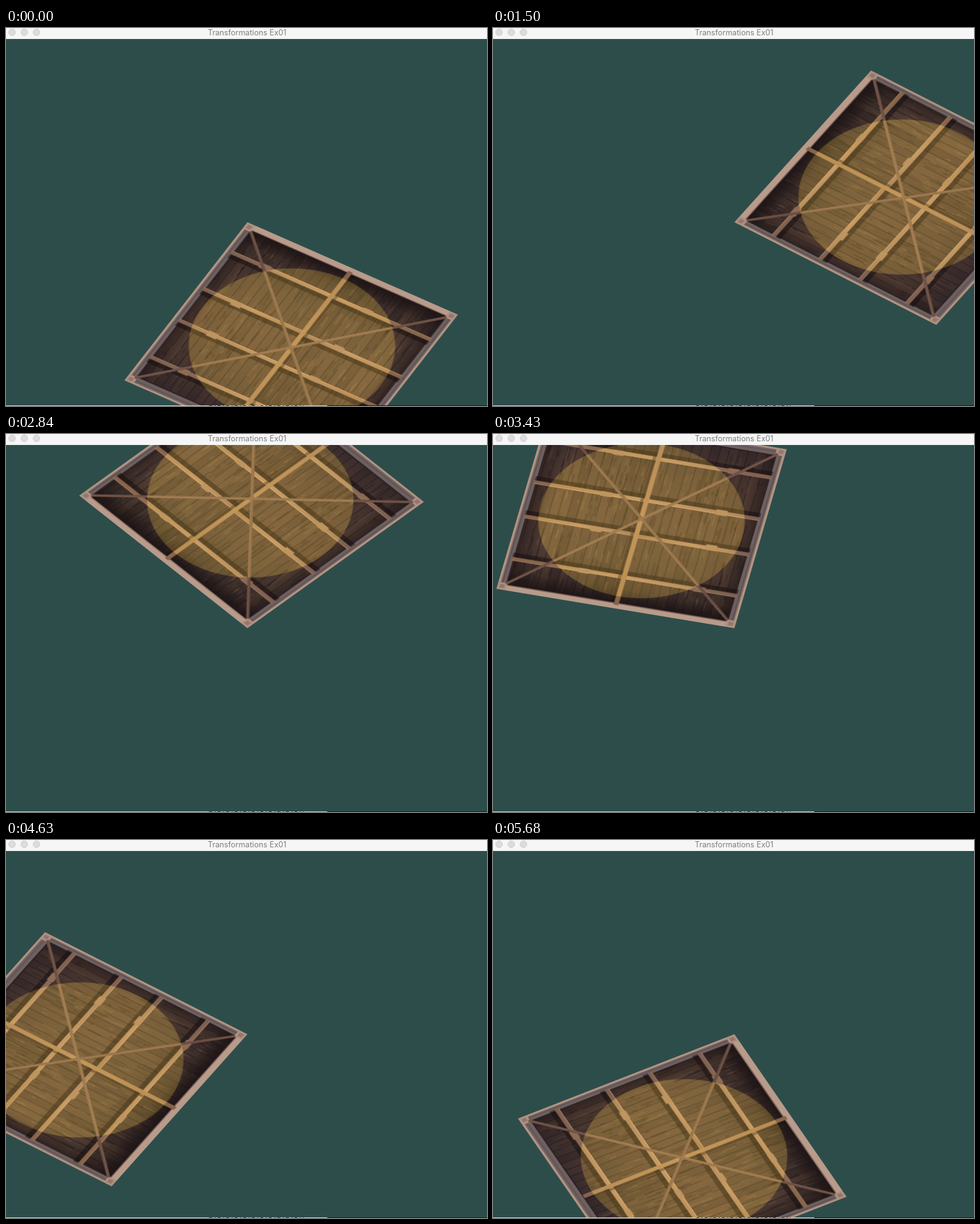
These frames come from a looping animation (789x619 px, 5780 ms). An HTML page with a canvas:

```html
<!DOCTYPE html>
<html lang="en">
<head>
<meta charset="utf-8">
<title>Transformations Ex01</title>
<style>
  html, body { margin: 0; width: 100%; height: 100%; overflow: hidden; }
  .stage { position: relative; width: 789px; height: 619px; overflow: hidden; background: #2d4d4b; }
  .bar {
    position: absolute; inset: 0 0 auto; height: 18px; background: #f6f6f6;
    box-shadow: inset 0 -1px #f0f7f4;
    font: 12.7px/15px Inter, sans-serif; color: #7d7d7d; text-align: center; text-indent: 2px;
  }
  .dot {
    position: absolute; top: 1px; width: 12px; height: 12px; box-sizing: border-box;
    border: 1px solid #cfcfcf; border-radius: 50%; background: #dcdcdc;
  }
  .view { position: absolute; inset: 18px 0 1px; overflow: hidden; }
  /* Rotation happens in square space, then the 4:3 viewport widens it. */
  .wide { position: absolute; left: 396px; top: 300px; transform: scale(1.33333, 1); transform-origin: 0 0; }
  .crate {
    display: block; width: 300px; height: 300px; transform-origin: 0 0;
    animation: spin 5780ms -2ms infinite;
  }
  .edge {
    position: absolute; inset: auto 0 0; height: 1px;
    background: linear-gradient(90deg, #d4d6d6 527px, #191420 527px);
  }
  .edge::after {
    content: ""; position: absolute; left: 333px; top: 0; width: 155px; height: 1px;
    background: repeating-linear-gradient(90deg, #555 0 5px, #d4d6d6 5px 9px, #777 9px 11px, #d4d6d6 11px 14px);
  }
  @keyframes spin {
    0%       { transform: rotate(30.3deg);    animation-timing-function: steps(4); }
    10.3806% { transform: rotate(-4.2deg);    animation-timing-function: steps(6); }
    25.9516% { transform: rotate(-55.9deg);   animation-timing-function: steps(5); }
    38.9273% { transform: rotate(-99.65deg);  animation-timing-function: steps(1); }
    41.3495% { transform: rotate(-108.14deg); animation-timing-function: steps(6); }
    56.9204% { transform: rotate(-159.11deg); animation-timing-function: steps(1); }
    59.3426% { transform: rotate(-167.6deg);  animation-timing-function: steps(8); }
    80.1038% { transform: rotate(-236.15deg); animation-timing-function: steps(7); }
    98.2699%, 100% { transform: rotate(-297.4deg); }
  }
</style>
</head>
<body>
<div class="stage">
  <div class="view"><div class="wide"><canvas class="crate" width="900" height="900"></canvas></div></div>
  <div class="bar">
    <i class="dot" style="left:4px"></i><i class="dot" style="left:24px"></i><i class="dot" style="left:44px"></i>
    Transformations Ex01
  </div>
  <div class="edge"></div>
</div>
<script>
  const ctx = document.querySelector('.crate').getContext('2d');
  ctx.scale(3, 3);

  let seed = 7;
  const rand = () => (seed = (seed * 16807) % 2147483647) / 2147483647;

  function rect(x, y, w, h, fill) {
    ctx.fillStyle = fill;
    ctx.fillRect(x, y, w, h);
  }

  function line(x1, y1, x2, y2, width, color) {
    ctx.lineWidth = width;
    ctx.strokeStyle = color;
    ctx.beginPath();
    ctx.moveTo(x1, y1);
    ctx.lineTo(x2, y2);
    ctx.stroke();
  }

  function fade(x1, y1, x2, y2, ...stops) {
    const g = ctx.createLinearGradient(x1, y1, x2, y2);
    stops.forEach((c, i) => g.addColorStop(i / (stops.length - 1), c));
    return g;
  }

  function planks() {
    rect(0, 0, 300, 300, fade(0, 0, 0, 300, '#2b2121', '#4a3932', '#513d35', '#493731', '#33282a'));
    for (let x = 10; x < 290; x += 11.5) {
      const tone = rand();
      rect(x, 10, 11.5, 280, tone < .5 ? `rgba(20,12,12,${.22 * tone})` : `rgba(140,100,70,${.22 * (tone - .5)})`);
      rect(x, 10, 1, 280, 'rgba(24,16,16,.5)');
    }
    // soft grain
    for (let i = 0; i < 420; i++) {
      const light = rand() < .5;
      rect(10 + rand() * 280, 10 + rand() * 260, 1 + rand() * 2.2, 5 + rand() * 17,
        light ? 'rgba(150,112,80,.17)' : 'rgba(22,14,14,.22)');
    }
    rect(10, 8, 280, 24, fade(0, 8, 0, 32, 'rgba(24,16,18,.75)', 'rgba(24,16,18,0)'));
    rect(10, 10, 24, 280, fade(10, 0, 34, 0, 'rgba(24,16,18,.5)', 'rgba(24,16,18,0)'));
    rect(266, 10, 24, 280, fade(266, 0, 290, 0, 'rgba(24,16,18,0)', 'rgba(24,16,18,.5)'));
  }

  function frame() {
    const band = '#6e6060', rim = '#b39582';
    rect(0, 0, 10, 300, band);
    rect(290, 0, 10, 300, band);
    rect(0, 288, 300, 12, band);
    rect(10, 10, 1.5, 278, '#2c2223');
    rect(288.5, 10, 1.5, 278, '#2c2223');
    rect(10, 286, 280, 2, '#2c2223');
    rect(5, 10, 1, 280, '#574a4c');
    rect(294, 10, 1, 280, '#574a4c');
    rect(10, 293, 280, 1, '#574a4c');
    rect(0, 0, 3, 300, rim);
    rect(297, 0, 3, 300, rim);
    rect(0, 297, 300, 3, rim);
    rect(0, 0, 300, 9, '#b89b8a');
    rect(0, 8, 300, 1.5, '#85695d');
    rect(10, 12, 280, 1.5, '#211819');
    for (const x of [0, 288]) for (const y of [0, 288]) {
      rect(x, y, 12, 12, '#ae9182');
      rect(x + 3, y + 3, 6, 6, '#92776a');
    }
  }

  function beam(x, y, w) {
    rect(x, y + 3, w, 7, 'rgba(20,13,14,.5)');
    rect(x, y - 3, w, 6, fade(x, 0, x + w, 0, '#7d6051', '#97735a', '#856449'));
    rect(x, y - 3, w, 1.2, 'rgba(190,150,118,.4)');
  }

  function beams() {
    beam(8, 52.5, 284);
    beam(8, 121.5, 142);
    beam(150, 123.5, 142);
    beam(8, 181, 284);
    beam(8, 250.5, 284);
    for (const y of [52.5, 122.5, 181, 250.5]) {
      rect(49, y - 4.5, 14, 9, '#8d6b55');
      rect(194, y - 4.5, 14, 8, '#8d6b55');
    }
    rect(154, 10, 4, 276, 'rgba(20,13,14,.4)');
    rect(147.5, 6, 6, 281, fade(0, 0, 0, 300, '#876349', '#946f50', '#85634f'));
    line(11, 11, 289, 290, 4, '#654b41');
    line(290, 11, 9, 290, 4, '#6b5045');
    line(11, 10, 289, 289, 1, '#79594a');
    line(290, 10, 9, 289, 1, '#7b5b4b');
  }

  function disc() {
    ctx.globalCompositeOperation = 'lighter';
    ctx.fillStyle = 'rgb(49,41,10)';
    ctx.beginPath();
    ctx.arc(149.5, 147.3, 127, 0, Math.PI * 2);
    ctx.fill();
  }

  planks();
  frame();
  beams();
  disc();
</script>
</body>
</html>
```
